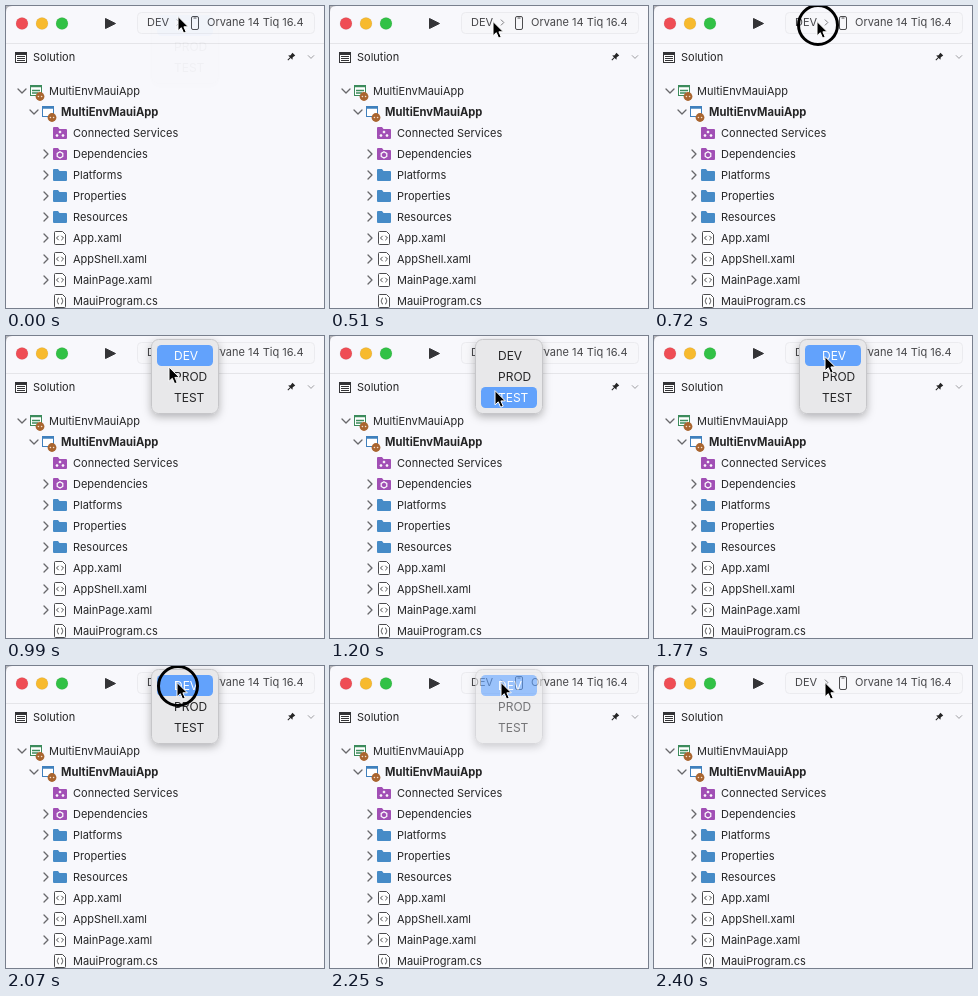
These frames come from a looping animation (318 by 302 pixels, 2.52 s). An HTML page:

```html
<!DOCTYPE html>
<html lang="en">
<head>
<meta charset="utf-8">
<style>
html, body { margin: 0; width: 100%; height: 100%; overflow: hidden; background: #f8f8fc; }
svg { display: block; font: 11px Inter, sans-serif; fill: #252526; }
.line { fill: none; stroke: #68686b; stroke-width: 1.3; stroke-linecap: round; stroke-linejoin: round; }
.file { fill: none; stroke: #4c4c4f; stroke-linejoin: round; }
.mark { fill: #fff; stroke: #fff; stroke-width: .7; }
.tool { fill: #464649; }
.menu text { font-size: 12px; }
</style>
</head>
<body>
<svg width="318" height="302" viewBox="0 0 318 302">
  <defs>
    <filter id="shadow" x="-30%" y="-30%" width="160%" height="160%">
      <feDropShadow dx="0" dy="3" stdDeviation="4" flood-opacity=".28"/>
    </filter>
    <path id="right" class="line" d="M-2-4 2 0-2 4"/>
    <path id="down" class="line" d="M-4-2 0 2 4-2"/>
    <path id="folder" d="M-7-5q0-1 1-1h4l1.5 2H6q1 0 1 1v8q0 1-1 1H-6q-1 0-1-1z"/>
    <g id="services" class="mark">
      <circle cx="-3" cy="2.5" r="1"/><circle cy="-1" r="1"/><circle cx="3" cy="2.5" r="1"/>
    </g>
    <path id="package" class="mark" d="M0-2.2 2.8-.6V2.4L0 4-2.8 2.4V-.6z" style="fill:none;stroke-width:1.2"/>
    <path id="page" class="file" d="M-4.5-6.5H2.5L5.5-3.5V5.5q0 1-1 1H-4.5q-1 0-1-1V-5.5q0-1 1-1z" style="fill:#fff"/>
    <path id="markup" class="file" d="M-1.3-2.2-3.5 0-1.3 2.2M1.3-2.2 3.5 0 1.3 2.2"/>
    <path id="braces" class="file" d="M-1-3q-1.2 0-1.2 1.2T-3.2 0q1 .6 1 1.8T-1 3M1-3q1.2 0 1.2 1.2T3.2 0q-1 .6-1 1.8T1 3"/>
    <g id="badge">
      <circle r="4.4" fill="#a9652f"/>
      <circle cx="-1.6" r=".8" fill="#f3dfcd"/><circle cx="1.6" r=".8" fill="#f3dfcd"/>
    </g>
  </defs>

  <rect width="318" height="302" fill="#f8f8fc"/>
  <path d="M0 0H6Q0 0 0 6z" fill="#b4b4b8"/>
  <path d="M0 37.5H318" stroke="#e5e5e9"/>
  <g stroke="#000" stroke-opacity=".1" stroke-width=".6">
    <circle cx="16" cy="17.5" r="6" fill="#ef4d55"/>
    <circle cx="36" cy="17.5" r="6" fill="#f7ba2e"/>
    <circle cx="56" cy="17.5" r="6" fill="#32c146"/>
  </g>
  <path d="M99.5 12.5 109.5 17.5 99.5 22.5z" fill="#343437" stroke="#343437" stroke-linejoin="round"/>
  <rect x="131.5" y="6.5" width="177" height="21" rx="4" fill="#f7f7fa" stroke="#ebebef"/>
  <text class="tool" x="141" y="20">DEV</text>
  <use href="#right" transform="translate(172.5 16.5) scale(.65)"/>
  <rect x="185.5" y="10.5" width="7" height="13" rx="1.5" fill="none" stroke="#4c4c4f"/>
  <path d="M187.5 12H190.5" stroke="#4c4c4f"/>
  <text class="tool" x="201" y="20">Orvane 14 Tiq 16.4</text>

  <rect x="9.5" y="46.5" width="11" height="10" fill="#fff" stroke="#343437"/>
  <path d="M9 47.5H21" stroke="#343437" stroke-width="3"/>
  <path d="M11 50.5H19M11 52.5H19M11 54.5H19" stroke="#343437"/>
  <text x="27" y="55">Solution</text>
  <path d="M-2-4H2L1.5-1 3 1H-3L-1.5-1zM-.5 1H.5V4.5H-.5z" transform="translate(285 51) rotate(45)"/>
  <use href="#down" transform="translate(305 51) scale(.7)" opacity=".7"/>

  <use href="#down" x="16" y="85"/>
  <rect x="24.5" y="79.5" width="11" height="10" fill="#fff" stroke="#3d8b5c"/>
  <path d="M24 80.5H36M26 84.5H34M26 87H32" stroke="#3d8b5c" stroke-width="1.6"/>
  <use href="#badge" x="34" y="90.5"/>
  <text x="43" y="89">MultiEnvMauiApp</text>
  <use href="#down" x="28" y="106"/>
  <rect x="36.5" y="100.5" width="11" height="10" fill="#fff" stroke="#3f80bd"/>
  <path d="M36 101.5H48" stroke="#3f80bd" stroke-width="2.5"/>
  <use href="#badge" x="46" y="111.5"/>
  <text x="55" y="110" font-weight="700" font-size="11.2">MultiEnvMauiApp</text>
  <g id="tree"></g>

  <g id="menu" class="menu">
    <rect x="145.5" y="3.5" width="67" height="74" rx="7" fill="#e8e8ea" stroke="#c6c6c9" filter="url(#shadow)"/>
    <rect id="bar" x="151" width="56" height="21" rx="4.5" fill="#62a2fc"/>
    <text x="168" y="24">DEV</text>
    <text x="168" y="45">PROD</text>
    <text x="168" y="66">TEST</text>
  </g>
  <circle id="ring" r="19.5" fill="none" stroke="#000" stroke-width="3"/>
  <path id="cursor" d="M0 0V14.2L3.3 11.2 5.6 16.6 8.2 15.5 5.9 10.3H10.3z" fill="#000" stroke="#fff" stroke-linejoin="round"/>
</svg>
<script>
const LOOP = 2520, ROW = 21;
const $ = id => document.getElementById(id);
const [menu, bar, ring, cursor] = ['menu', 'bar', 'ring', 'cursor'].map($);
const labels = menu.querySelectorAll('text');

const PURPLE = '#a14fb5', BLUE = '#468bc7';
const rows = [
  ['Connected Services', 'folder', 'services', PURPLE],
  ['Dependencies', 'folder', 'package', PURPLE],
  ...['Platforms', 'Properties', 'Resources'].map(name => [name, 'folder', '', BLUE]),
  ...['App', 'AppShell', 'MainPage'].map(name => [name + '.xaml', 'page', 'markup']),
  ['MauiProgram.cs', 'page', 'braces']
];
$('tree').innerHTML = rows.map(([name, icon, mark, color = 'none'], i) => {
  const y = 127 + i * ROW;
  const use = (id, x) => `<use href="#${id}" x="${x}" y="${y}" fill="${color}"/>`;
  const arrow = i > 0 && i < rows.length - 1 ? use('right', 40) : '';
  return arrow + use(icon, 54) + (mark && use(mark, 54)) + `<text x="67" y="${y + 4}">${name}</text>`;
}).join('');

// time, x, y of the pointer tip
const path = [
  [0, 172, 10.5], [330, 172, 10.5], [510, 163, 15.5], [870, 163, 15.5], [990, 163, 31],
  [1200, 165, 54.5], [1290, 166, 65], [1410, 166, 55], [1590, 169, 32.5],
  [1740, 171, 21.5], [1920, 171, 16.5], [LOOP, 171, 16.5]
];
const clamp = v => Math.max(0, Math.min(1, v));

function pointer(t) {
  const i = Math.max(1, path.findIndex(p => p[0] >= t));
  const [t0, x0, y0] = path[i - 1], [t1, x1, y1] = path[i];
  const k = clamp((t - t0) / (t1 - t0));
  return [x0 + (x1 - x0) * k, y0 + (y1 - y0) * k];
}

const press = (t, start) => clamp(Math.min(t - start, start + 180 - t) / 60);

function menuOpacity(t) {
  if (t < 330) return 0.03;
  return t < 750 ? 0 : clamp((2400 - t) / 240);
}

function draw(now) {
  const t = now % LOOP;
  const [x, y] = pointer(t);
  cursor.setAttribute('transform', `translate(${x} ${y})`);
  ring.setAttribute('transform', `translate(${x + 1} ${y + 3.5})`);
  ring.setAttribute('opacity', Math.max(press(t, 630), press(t, 1980)));

  // the highlight trails the pointer slightly
  const lagged = pointer(Math.max(0, t - 30))[1];
  const row = Math.max(0, Math.min(2, Math.floor((lagged - 9) / ROW)));
  menu.setAttribute('opacity', menuOpacity(t));
  bar.setAttribute('y', 9 + row * ROW);
  labels.forEach((label, i) => label.setAttribute('fill', i === row ? '#fff' : '#252526'));
  requestAnimationFrame(draw);
}
requestAnimationFrame(draw);
</script>
</body>
</html>
```
